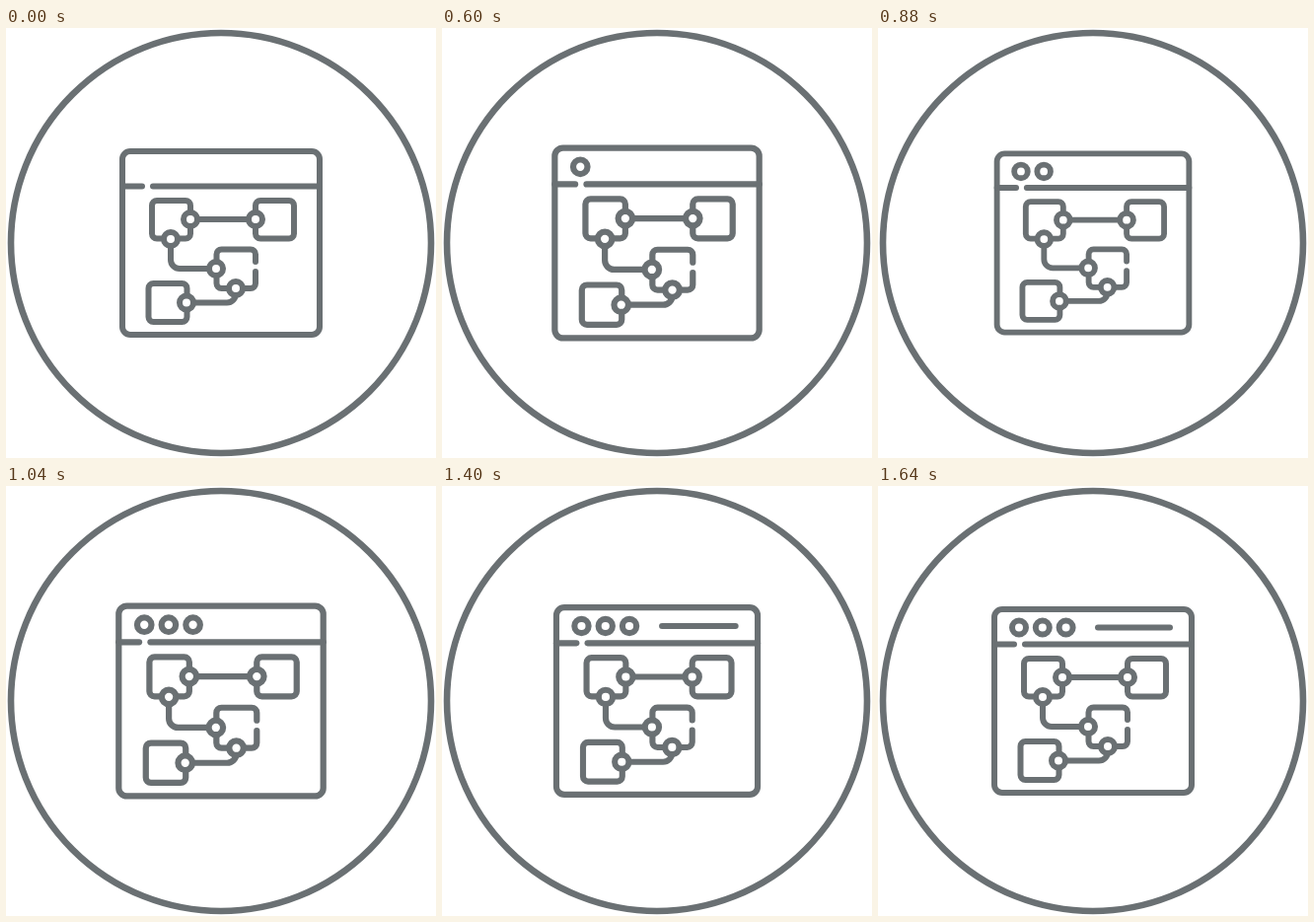
An HTML page with a canvas that plays this animation: 436x436 px, repeating every 2440 ms.

```html
<!DOCTYPE html>
<html>
<head>
<meta charset="utf-8">
<style>
  html, body { margin: 0; width: 100%; height: 100%; overflow: hidden; background: #fff; }
  canvas { display: block; width: 436px; height: 436px; }
</style>
</head>
<body>
<canvas id="stage" width="436" height="436"></canvas>
<script>
const ctx = document.getElementById('stage').getContext('2d');
const LOOP = 2440, START = 400, STEP = 40, LAST_STEP = 31;
const INK = '#6a7073', CENTER = 218;
const SWING = 0.037, SEGMENT = 32 / 6;
const SCALES = [0, 1, -1, 1, -1, 1, 0];

// Eased swing between alternating larger and smaller sizes.
function scaleAt(step) {
  if (step <= 0 || step >= LAST_STEP) return 1;
  const i = Math.floor(step / SEGMENT);
  const ease = (1 - Math.cos(Math.PI * (step / SEGMENT - i))) / 2;
  return 1 + SWING * (SCALES[i] + (SCALES[i + 1] - SCALES[i]) * ease);
}

function stroke(build) {
  ctx.beginPath();
  build();
  ctx.stroke();
}

function line(x1, y1, x2, y2) {
  stroke(() => { ctx.moveTo(x1, y1); ctx.lineTo(x2, y2); });
}

function box(x, y, w, h, r) {
  stroke(() => ctx.roundRect(x, y, w, h, r));
}

function ring(x, y) {
  ctx.beginPath();
  ctx.arc(x, y, 7, 0, Math.PI * 2);
  ctx.fill();
  ctx.stroke();
}

function drawWindow() {
  box(118, 125, 200, 186, 8);
  line(118, 160.5, 138, 160.5);
  line(149, 160.5, 318, 160.5);
}

function drawDiagram() {
  box(148, 175, 39, 38.5, 5);
  box(253, 175, 39, 38.5, 5);
  box(144.5, 259, 39, 39, 5);

  // Middle box, open on its right side
  stroke(() => {
    ctx.moveTo(253, 237);
    ctx.arcTo(253, 224.5, 213.5, 224.5, 5);
    ctx.arcTo(213.5, 224.5, 213.5, 264, 5);
    ctx.arcTo(213.5, 264, 253, 264, 5);
    ctx.arcTo(253, 264, 253, 247, 5);
    ctx.lineTo(253, 247);
  });

  line(187, 194, 253, 194);
  stroke(() => {
    ctx.moveTo(167, 214);
    ctx.arcTo(167, 244, 213, 244, 9);
    ctx.lineTo(213, 244);
  });
  stroke(() => {
    ctx.moveTo(183, 278.5);
    ctx.arcTo(233, 278.5, 233, 264, 9);
    ctx.lineTo(233, 264);
  });

  ring(187, 194);
  ring(167, 214);
  ring(253, 194);
  ring(213, 244);
  ring(233, 264);
  ring(183, 278.5);
}

function drawControls(step) {
  const shown = step < 0 ? 0 : Math.floor(step / 8) + 1;
  for (let i = 0; i < Math.min(shown, 3); i++) ring(143 + i * 23.8, 143.5);
  if (shown > 3) line(223, 143.5, 296, 143.5);
}

function draw(time) {
  const step = Math.min(LAST_STEP, Math.floor((time % LOOP - START) / STEP));
  const scale = scaleAt(step);

  ctx.fillStyle = '#fff';
  ctx.fillRect(0, 0, 436, 436);
  ctx.strokeStyle = INK;
  ctx.lineCap = ctx.lineJoin = 'round';

  ctx.lineWidth = 6.6;
  stroke(() => ctx.arc(CENTER, CENTER, 213, 0, Math.PI * 2));

  ctx.save();
  ctx.translate(CENTER, CENTER);
  ctx.scale(scale, scale);
  ctx.translate(-CENTER, -CENTER);
  ctx.lineWidth = 6;
  drawWindow();
  drawDiagram();
  drawControls(step);
  ctx.restore();
}

const began = performance.now();
function tick() {
  draw(performance.now() - began);
  requestAnimationFrame(tick);
}
tick();
</script>
</body>
</html>
```
